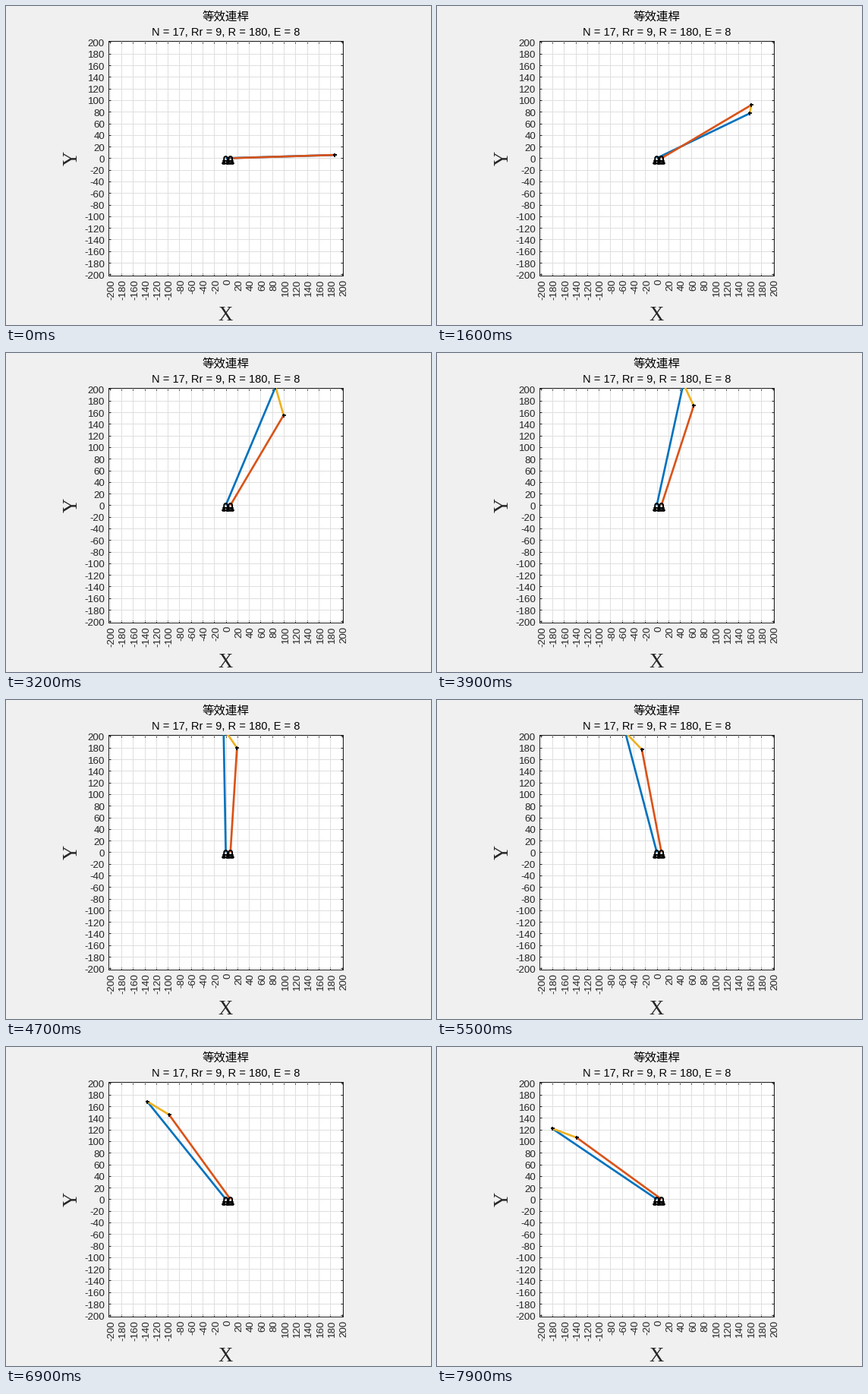
Recreate the animation shown at these times as a matplotlib script. Size 560 by 420 pixels, loop 8 s.

```python
import numpy as np
import matplotlib.pyplot as plt
from matplotlib.animation import FuncAnimation

W, H, DPI = 560, 420, 80
PX = 72 / DPI                      # points per pixel
N, RR, R, E = 17, 9, 180, 8
FRAMES, STEP = 80, np.radians(1.8)
LIM = 202
CX, CY, HALF = 289.6, 200.4, 154.5   # plot centre and half size in pixels
INK = (0.15, 0.15, 0.15)
BLUE, ORANGE, YELLOW = "#0072BD", "#D95319", "#EDB120"

fig = plt.figure(figsize=(W / DPI, H / DPI), dpi=DPI, facecolor="#F0F0F0")
ax = fig.add_axes([(CX - HALF) / W, 1 - (CY + HALF) / H, 2 * HALF / W, 2 * HALF / H])


def label(x, y, s, size, font="Liberation Sans", color=INK, **kw):
    kw.setdefault("ha", "center")
    fig.text(x / W, 1 - y / H, s, fontsize=size * PX, family=font, color=color,
             va="baseline", rotation_mode="anchor", **kw)


def setup_axes():
    ax.set(xlim=(-LIM, LIM), ylim=(-LIM, LIM))
    ticks = np.arange(-200, 201, 20)
    ax.set_xticks(ticks)
    ax.set_yticks(ticks)
    ax.tick_params(direction="in", length=3 * PX, width=PX, color=INK, top=True,
                   right=True, labelbottom=False, labelleft=False)
    ax.grid(color="#DFDFDF", lw=PX)
    ax.set_axisbelow(True)
    for side in ax.spines.values():
        side.set(color=INK, linewidth=PX)
    k = HALF / LIM
    for v in ticks:
        label(130, CY - v * k + 5.5, str(v), 13.33, ha="right")
        label(CX + v * k + 5.7, 360, str(v), 13.33, ha="right", rotation=90)
    label(289, 19, "等效連桿", 15.5, "Noto Sans CJK JP", "black")
    label(289.7, 39, f"N = {N}, Rr = {RR}, R = {R}, E = {E}", 14.67, color="black")
    label(288.7, 414, "X", 26.7, "Liberation Serif")
    label(94, CY, "Y", 26.7, "Liberation Serif", rotation=90)


def support(x):
    """Fixed pivot: an arch standing on a hatched foot."""
    style = dict(color="black", lw=2 * PX, zorder=6)
    a = np.linspace(0, np.pi, 13)
    ax.plot(x + np.r_[3, 3 * np.cos(a), -3], np.r_[-5, 3 * np.sin(a), -5], **style)
    ax.plot([x - 3, x + 3], [-5, -5], **style)
    foot = x + np.linspace(-4.5, 4.5, 4)
    ax.plot(np.r_[x - 3, foot, x + 3], np.r_[-5, np.full(4, -RR), -5],
            marker="+", ms=4.2 * PX, mew=1.5 * PX, **style)


def cross(u, v):
    return u[0] * v[1] - u[1] * v[0]


def meet(p, u, q, v):
    """Intersection of the lines p + s*u and q + t*v."""
    return p + u * cross(q - p, v) / cross(u, v)


def linkage(theta):
    """Moving joints of the four-bar linkage, found by Bobillier's construction."""
    o, c = np.zeros(2), np.array([E, 0.0])
    pole = np.array([E * (N + 1), 0.0])
    arm = R * np.array([np.cos(theta), np.sin(theta)])
    a = c + arm
    normal = a - pole
    q = meet(c, arm, pole, np.array([normal[1], -normal[0]]))
    return o, meet(o, q, pole, normal), a, c


setup_axes()
blue, orange, yellow = (
    ax.plot([], [], color=col, lw=2.67 * PX, zorder=z, solid_capstyle="butt")[0]
    for z, col in enumerate((BLUE, ORANGE, YELLOW), 3))
joints, = ax.plot([], [], "k+", ms=5 * PX, mew=1.7 * PX, zorder=6)
support(0)
support(E)


def update(i):
    o, b, a, c = linkage(STEP * (i + 1))
    for line, ends in ((blue, (o, b)), (orange, (c, a)), (yellow, (b, a)),
                       (joints, (b, a))):
        line.set_data(*np.transpose(ends))
    return blue, orange, yellow, joints


anim = FuncAnimation(fig, update, frames=FRAMES, interval=100, repeat=True,
                     repeat_delay=0, blit=False)
plt.show()
```
